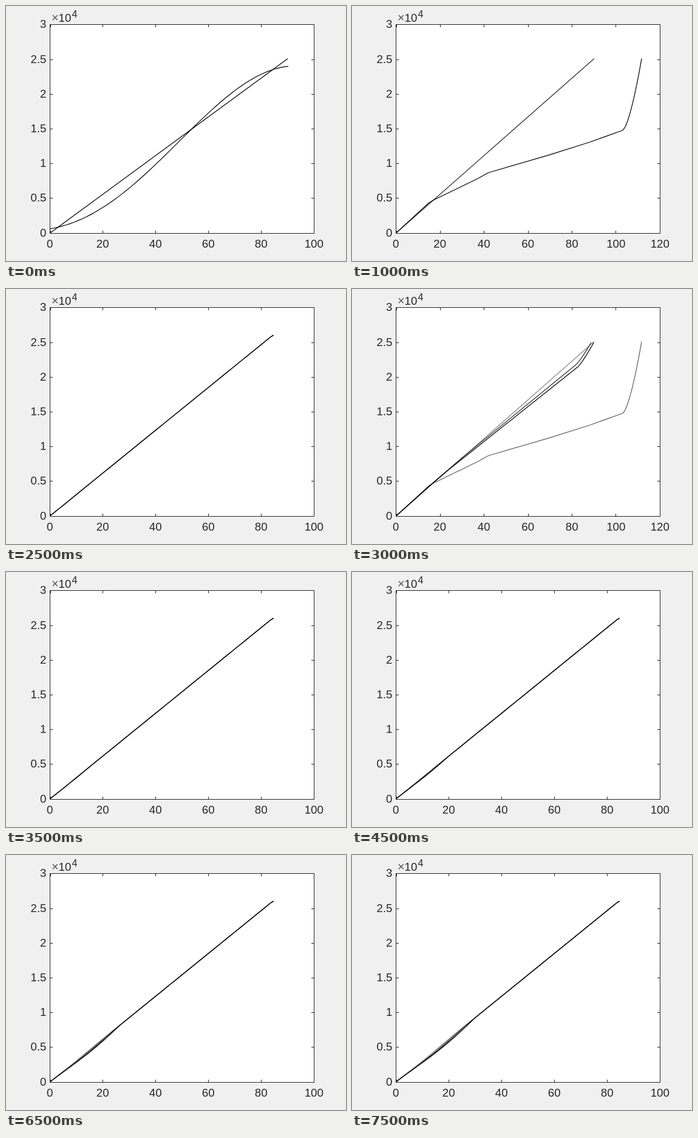
An HTML page for the animation above (8 s loop, 560 by 420 pixels).

```html
<!DOCTYPE html>
<html lang="en">
<head>
<meta charset="utf-8">
<title>Curve iterations</title>
<style>
  html, body { margin: 0; width: 100%; height: 100%; overflow: hidden; background: #f0f0f0; }
  svg { display: block; width: 560px; height: 420px; }
  text { font: 18.67px "Liberation Sans", Arial, sans-serif; fill: #262626; }
  .times { font-size: 20px; fill: #555; }
  .sup { font-size: 16px; }
  .axes { fill: none; stroke: #262626; stroke-width: 1; }
  .trace { fill: none; stroke-width: 1.2; stroke-linejoin: round; }
</style>
</head>
<body>
<svg id="plot" viewBox="0 0 560 420"></svg>
<script>
const STEP = 500, STEPS = 16, WINDOW = 5, FADE = 46;
const L = 72.5, R = 507.5, T = 30.5, B = 374.5, TICK = 4.5;
const svg = document.getElementById('plot');

const lerp = (a, b, t) => a + (b - a) * t;
const sample = (count, f) => Array.from({ length: count + 1 }, (_, i) => f(i / count));

// Data points are [x, y in thousands].
const SLOPE = 0.2783;
const base = [[0, 0.05], [90, 0.05 + 90 * SLOPE]];

const sCurve = sample(60, u => {
  const w = 0.06 + 0.8 * u + 0.11 * u * u;
  return [90.2 * u, 0.45 + 23.6 * Math.sin(Math.PI / 2 * w) ** 2];
});

// A final climb that steepens towards its end.
const climb = (from, to, power) =>
  sample(8, u => [lerp(from[0], to[0], u), lerp(from[1], to[1], u ** power)]);

function detour() {
  const knee = [103, 14.8];
  return [[0, 0.05], [15, 4.4], [17, 4.78], [37, 7.85], [42, 8.72], [70, 11.3], [88, 13.1], [95, 13.9]]
    .concat(climb(knee, [111.6, 25.1], 1.5));
}

// Lines that settle towards a bend near the end.
function bent(n) {
  if (n === 0) return base;
  if (n === 1) return detour();
  const s = 1 - 0.5 ** (n - 2);
  const hinge = 30 - 14 * s, x = 81.8 + 1.6 * s;
  const knee = [x, x * SLOPE - 0.97 - 1.1 * s];
  return [[0, 0.05], [15, 4.32], [hinge, hinge * SLOPE + 0.07]]
    .concat(climb(knee, [88.7 + 2.4 * s, 24.98], 1.15));
}

// Lines whose lower part sags further each time.
function sagging(n) {
  const reach = 6.7 + 3.33 * n, depth = Math.max(0.02, 0.1 * n - 0.25);
  const turn = 83.6 - 0.25 * n;
  const line = sample(84, u => {
    const x = u * turn;
    const sag = x < reach ? depth * Math.sin(Math.PI * (x / reach) ** 1.3) : 0;
    return [x, 0.07 + 0.3077 * x - sag];
  });
  return [...line, [83.6, 25.8], [84.6, 26.02]];
}

function tracesAt(step) {
  if (step === 0) return [[base, 0], [sCurve, 0]];
  const n = step >> 1, make = step % 2 ? sagging : bent;
  const list = [];
  for (let i = Math.max(0, n - WINDOW + 1); i <= n; i++) list.push([make(i), n - i]);
  return list;
}

const label = (x, y, anchor, s, cls = '') =>
  `<text class="${cls}" x="${x}" y="${y}" text-anchor="${anchor}">${s}</text>`;

function draw(step) {
  const traces = tracesAt(step);
  const ends = traces.map(([p]) => p[p.length - 1]);
  const limit = (k, unit) => Math.ceil(Math.max(...ends.map(p => p[k])) / unit) * unit;
  const xMax = limit(0, 20), yMax = limit(1, 5);
  const px = x => lerp(L, R, x / xMax);
  const py = y => lerp(B, T, y / yMax);
  const snap = v => Math.floor(v) + 0.5;

  let lines = '', ticks = `M${L} ${T}H${R}V${B}H${L}Z`, labels = '';
  for (const [points, age] of traces) {
    const g = age * FADE;
    const d = points.map(([x, y]) => `${px(x).toFixed(2)},${py(y).toFixed(2)}`).join(' ');
    lines += `<polyline class="trace" points="${d}" stroke="rgb(${g},${g},${g})"/>`;
  }
  // Ticks snap to pixels from a frame slightly inside the box.
  for (let x = 0; x <= xMax; x += 20) {
    const at = snap(lerp(73.1, 507.1, x / xMax));
    ticks += `M${at} ${B}v${-TICK}M${at} ${T}v${TICK}`;
    labels += label(px(x) - 0.3, 398, 'middle', x);
  }
  for (let y = 0; y <= yMax; y += 5) {
    const at = snap(lerp(374, 30.9, y / yMax));
    ticks += `M${L} ${at}h${TICK}M${R} ${at}h${-TICK}`;
    labels += label(66.5, at + 5.5, 'end', y / 10);
  }
  svg.innerHTML = `<rect width="560" height="420" fill="#f0f0f0"/>
    <rect x="${L}" y="${T}" width="${R - L}" height="${B - T}" fill="#fff"/>
    ${lines}<path class="axes" d="${ticks}"/>${labels}
    ${label(75, 26, 'start', '×', 'times')}${label(86.5, 26, 'start', '10')}
    ${label(108.5, 18.5, 'start', '4', 'sup')}`;
}

let shown = -1;
const start = performance.now();
function tick(now) {
  const step = Math.floor(Math.max(0, now - start) / STEP) % STEPS;
  if (step !== shown) draw(shown = step);
  requestAnimationFrame(tick);
}
tick(start);
</script>
</body>
</html>
```
